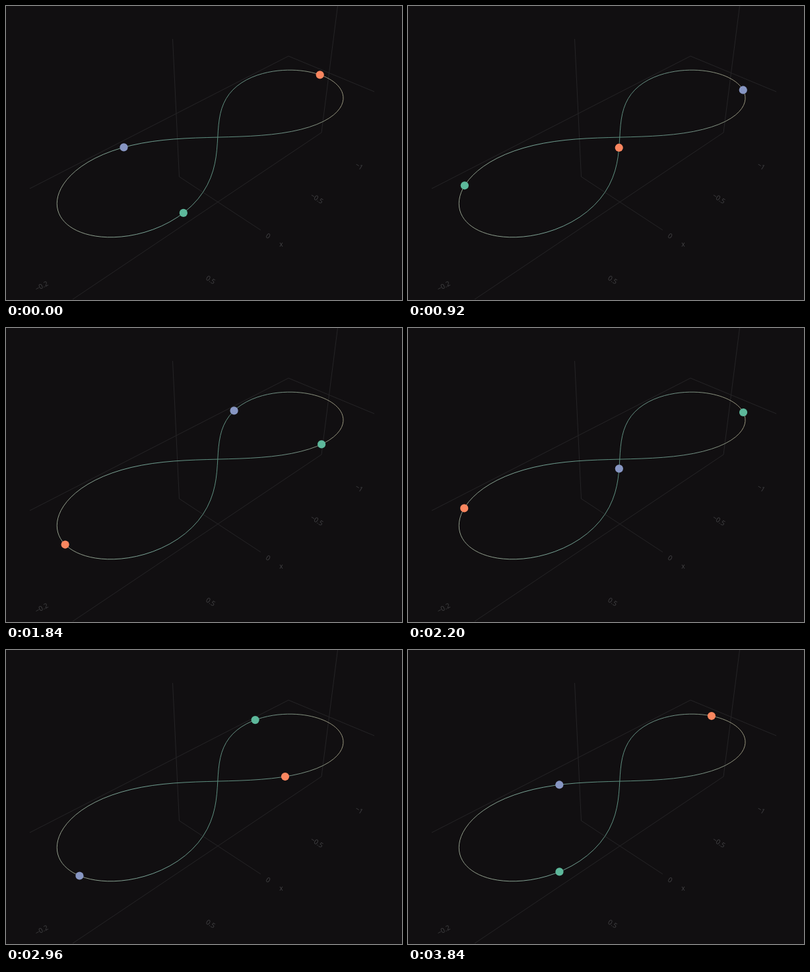
Write an HTML page that moves like this. It is 600 px wide and 446 px high and loops after 3.88 s.

```html
<!DOCTYPE html>
<html lang="en">
<head>
<meta charset="utf-8">
<title>Figure-eight orbit</title>
<style>
  html, body { margin: 0; width: 100%; height: 100%; overflow: hidden; background: #110f11; }
  svg { display: block; width: 600px; height: 446px; }
  .axes { fill: none; stroke: #252426; stroke-width: 1; }
  .labels { fill: #434345; font: 10.3px "Open Sans", sans-serif; text-anchor: middle; }
  #orbit { fill: none; stroke: url(#tint); stroke-width: .95; }
</style>
</head>
<body>
<svg viewBox="0 0 600 446">
  <defs>
    <linearGradient id="tint" gradientUnits="userSpaceOnUse" x1="90" y1="270" x2="505" y2="160">
      <stop offset="0" stop-color="#99a491"/>
      <stop offset=".25" stop-color="#7cab9d"/>
      <stop offset=".55" stop-color="#609484"/>
      <stop offset=".8" stop-color="#73968a"/>
      <stop offset="1" stop-color="#9d9a82"/>
    </linearGradient>
  </defs>
  <g class="axes">
    <path d="M36 277 428 76 558 130"/>
    <path d="M252.5 50 262.5 259 386 340"/>
    <path d="M101 445 478 192 502.5 0"/>
  </g>
  <g class="labels">
    <text transform="translate(535 243) rotate(33)" y="3.5">−1</text>
    <text transform="translate(471 292) rotate(33)" y="3.5">−0.5</text>
    <text transform="translate(397 349) rotate(33)" y="3.5">0</text>
    <text transform="translate(310 415.5) rotate(33)" y="3.5">0.5</text>
    <text transform="translate(54 425) rotate(-28)" y="3.5">−0.2</text>
    <text x="417" y="364.5">x</text>
  </g>
  <path id="orbit"/>
  <g id="bodies">
    <circle r="6.1" fill="#fa865f"/>
    <circle r="6.1" fill="#5db89b"/>
    <circle r="6.1" fill="#8796c3"/>
  </g>
</svg>
<script>
const LOOP = 3880, STEP = 40;
const PERIOD = 6.32591398, SAMPLES = 720, SUB = 5;

// Equal-mass three-body choreography, integrated with leapfrog.
function traceOrbit() {
  const dt = PERIOD / SAMPLES / SUB;
  const pos = [[0, 0], [0.97000436, -0.24308753], [-0.97000436, 0.24308753]];
  const vx = 0.93240737, vy = 0.86473146;
  const vel = [[vx, vy], [-vx / 2, -vy / 2], [-vx / 2, -vy / 2]];
  const kick = h => {
    for (let i = 0; i < 3; i++) for (let j = 0; j < 3; j++) {
      if (i === j) continue;
      const dx = pos[j][0] - pos[i][0], dy = pos[j][1] - pos[i][1];
      const k = h / Math.hypot(dx, dy) ** 3;
      vel[i][0] += k * dx;
      vel[i][1] += k * dy;
    }
  };
  const out = [];
  for (let n = 0; n < SAMPLES * SUB; n++) {
    if (n % SUB === 0) out.push(project(pos[0]));
    kick(dt / 2);
    pos.forEach((p, i) => { p[0] += vel[i][0] * dt; p[1] += vel[i][1] * dt; });
    kick(dt / 2);
  }
  return out;
}

// Perspective view of the orbital plane.
function project([x, y]) {
  const w = 1 - 0.162 * x - 0.16 * y;
  return [(320.8 - 226.2 * x + 124.5 * y) / w, (199.1 + 68.5 * x + 67.5 * y) / w];
}

const track = traceOrbit();

function pointAt(deg) {
  const s = (deg % 360) / 360 * SAMPLES, i = Math.floor(s), f = s - i;
  const a = track[i % SAMPLES], b = track[(i + 1) % SAMPLES];
  return [a[0] + (b[0] - a[0]) * f, a[1] + (b[1] - a[1]) * f];
}

// Time in ms and phase in degrees; equal phases are short holds.
const pace = [
  [0, 273.7], [520, 327.6], [560, 327.6], [920, 364.9], [1000, 372.7], [1040, 372.7],
  [1480, 415.8], [1920, 460.2], [1960, 460.2], [2200, 484.4], [2680, 529.7],
  [3040, 567.4], [3080, 567.4], [3320, 592.5], [3840, 643.4], [3880, 647.3]
];

function phaseAt(t) {
  const i = pace.findIndex(k => k[0] > t);
  const [t0, p0] = pace[i - 1], [t1, p1] = pace[i];
  return p0 + (p1 - p0) * (t - t0) / (t1 - t0);
}

const line = track.filter((p, i) => i % 6 === 0).map(p => p.map(v => v.toFixed(2)).join(" "));
document.getElementById("orbit").setAttribute("d", "M" + line.join("L") + "Z");

const bodies = [...document.getElementById("bodies").children];
const start = performance.now();

function draw() {
  const t = (performance.now() - start) % LOOP;
  const phase = phaseAt(Math.floor(t / STEP) * STEP);
  bodies.forEach((c, i) => {
    const [x, y] = pointAt(phase + 120 * i);
    c.setAttribute("cx", x.toFixed(2));
    c.setAttribute("cy", y.toFixed(2));
  });
  requestAnimationFrame(draw);
}
draw();
</script>
</body>
</html>
```
